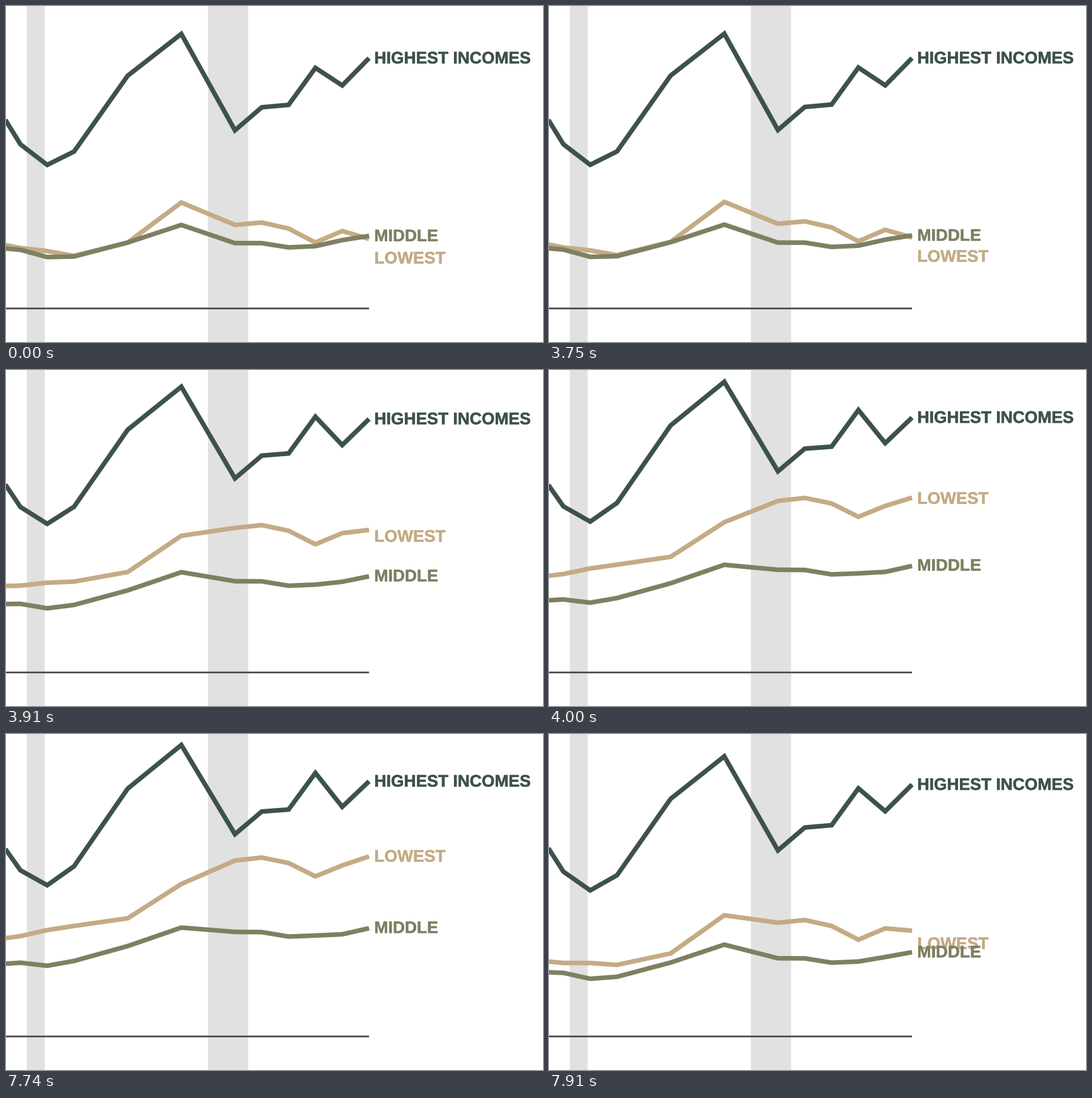
Recreate the animation shown at these times as a matplotlib script. Size 886 px wide and 554 px high, loop 7990 ms.

```python
import numpy as np
import matplotlib.pyplot as plt
from matplotlib.animation import FuncAnimation
from matplotlib.patches import Rectangle
from matplotlib.patheffects import withStroke

W, H, DPI = 886, 554, 64
PT = 72 / DPI  # points per pixel
STEP, FRAMES = 85, 94  # ms per frame, frames per loop

plt.rcParams["font.family"] = "Liberation Sans"

YEARS = np.arange(15)
X = 599 - 44.25 * YEARS[::-1]
TURNS = np.delete(YEARS, [4, 6, 8])  # years where the lines turn
BENDS = [0, 3, 7, 9, 12, 13, 14]     # years where the lift bends

fig = plt.figure(figsize=(W / DPI, H / DPI), dpi=DPI, facecolor="white")
ax = fig.add_axes([0, 0, 1, 1])
ax.set_xlim(0, W)
ax.set_ylim(H, 0)
ax.axis("off")


def box(x0, y0, x1, y1, color):
    ax.add_patch(Rectangle((x0, y0), x1 - x0, y1 - y0,
                           color=color, lw=0, snap=False))


class Series:
    """A labelled line that rises by its lift as progress goes from 0 to 1."""

    def __init__(self, name, color, heights, lift, base, rise):
        self.y = np.interp(YEARS, TURNS, heights)
        self.lift = np.interp(YEARS, BENDS, lift)
        self.base, self.rise = base, rise
        self.line, = ax.plot(X, self.y, color=color, lw=7.6 * PT,
                             solid_capstyle="butt", solid_joinstyle="miter")
        bold = withStroke(linewidth=0.5 * PT, foreground=color)
        self.label = ax.text(607.6, base, name, color=color, size=27.5 * PT,
                             weight="bold", va="baseline", path_effects=[bold])

    def move(self, p):
        self.line.set_ydata(self.y - self.lift * p)
        self.label.set_y(self.base - self.rise * p)


box(34.3, 0, 63.8, H, "#e1e1e1")
box(333.2, 0, 399.5, H, "#e1e1e1")
box(-1, 497.3, 599, 500.1, "#4a4a4a")

series = [
    Series("LOWEST", "#c4ab85",
           [390, 399, 404, 412, 390, 324, 361, 357, 367, 390, 371, 384],
           [51, 96, 77, 153, 156, 155, 183], 424.5, 215),
    Series("MIDDLE", "#7f8062",
           [398, 402, 414, 413, 390, 361, 391, 391, 398, 396, 386, 379],
           [18, 39, 42, 65, 64, 56, 59], 387.8, 60),
    Series("HIGHEST INCOMES", "#3d524a",
           [156, 228, 262, 240, 115, 46, 205, 167, 163, 102, 131, 86],
           [-6, 22, 28, 40, 38, 11, 8], 94.7, 8),
]


def ease(u):
    """Cubic ease in and out, clamped to 0..1."""
    u = min(max(u, 0), 1)
    return 4 * u**3 if u < 0.5 else 1 - 4 * (1 - u) ** 3


def draw(i):
    t = i * STEP
    p = ease((t - 3679) / 413) - ease((t - 7696) / 369)
    for s in series:
        s.move(p)


anim = FuncAnimation(fig, draw, frames=FRAMES, interval=STEP,
                     repeat=True, repeat_delay=0, blit=False)
plt.show()
```
